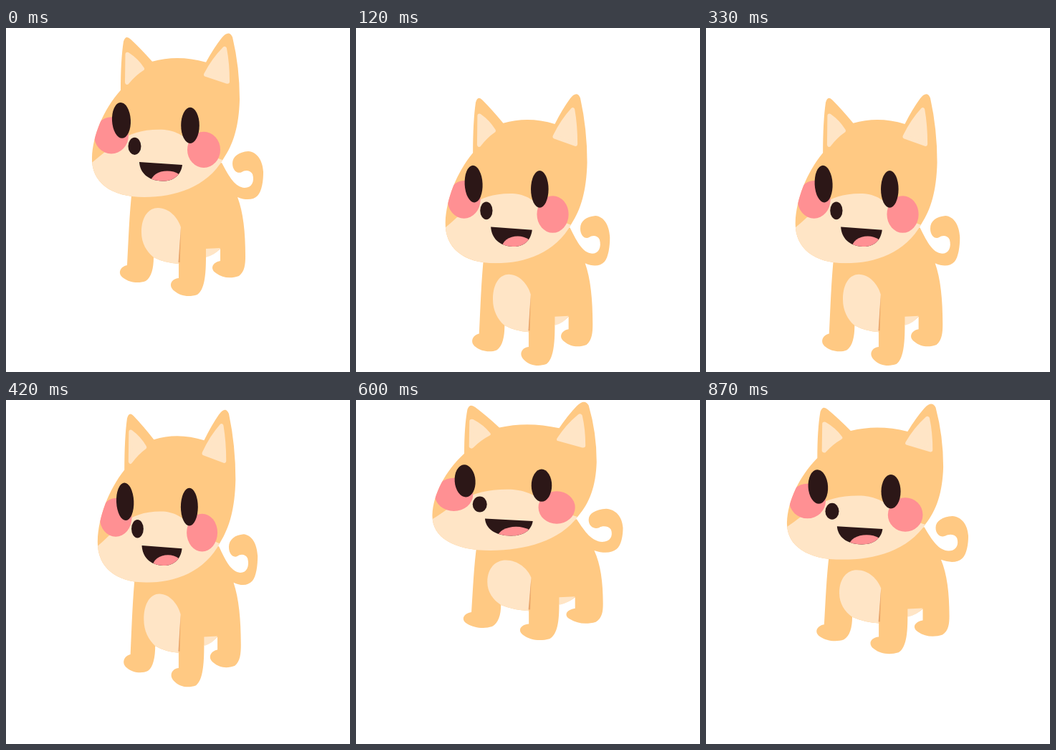
An HTML page that plays this animation: 480 by 480 pixels, repeating every 0.9 s.

```html
<!DOCTYPE html>
<html lang="en">
<head>
<meta charset="utf-8">
<title>Bouncing puppy</title>
<style>
  html, body { margin: 0; width: 100%; height: 100%; overflow: hidden; background: #fff; }
  svg { display: block; width: 100%; height: 100%; }
  .fur { fill: #ffc983; }
  .cream { fill: #ffe5c6; }
  .ear { fill: #ffe5c6; stroke: #ffe5c6; stroke-width: 6; stroke-linejoin: round; }
  .pink { fill: #ff9093; }
  .dark { fill: #2c1717; }
</style>
</head>
<body>
<svg viewBox="0 0 480 480">
  <defs>
    <path id="head" d="M160 87Q160 45 164 19Q167 9 174 16Q188 29 204 47Q240 37 279 48Q290 28 301 14Q311 2 316 13Q326 55 326 100C325 138 317 163 303 183C280 222 236 236 193 236C146 236 119 215 120 181C121 150 136 114 160 87Z"/>
    <path id="mouth" d="M186 187L246 191C244 207 232 214 218 213.5C198 213 187 202 186 187Z"/>
    <clipPath id="inHead"><use href="#head"/></clipPath>
    <clipPath id="inMouth"><use href="#mouth"/></clipPath>
  </defs>
  <g id="dog">
    <!-- body, legs and tail -->
    <path class="fur" d="M176 225C172 260 171 295 169 331C159 333 155 343 164 349C172 355 185 357 195 353C203 348 206 335 206 320Q222 328 241 329V349C230 350 226 360 235 367C243 374 255 376 267 372C277 365 279 345 279 319Q291 316 299 308V325C288 327 284 336 293 342C302 349 314 350 325 346C333 340 334 330 334 318C334 285 331 257 323 236C335 241 345 240 351 234C357 228 359 213 359 201C358 184 350 173 338 172C325 173 316 179 316 189C316 199 323 204 329 201C333 198 341 198 344 204C347 214 343 223 333 223C320 222 312 209 301 188Z"/>
    <path class="cream" d="M189 285C189 262 200 251 212 251C228 251 240 265 244 278L241 329Q222 328 206 320C196 312 189 300 189 285ZM279 308L299 307Q293 316 279 320Z"/>
    <path fill="#e9a66b" d="M244 278L242.7 327L240.5 327Z"/>
    <!-- head -->
    <use href="#head" class="fur"/>
    <path class="ear" d="M169.5 37Q182 45 190 57Q179 64 169 76Z"/>
    <path class="ear" d="M305 29Q309 50 309 75L279 65Q290 44 305 29Z"/>
    <g clip-path="url(#inHead)">
      <path class="cream" d="M117 190C148 168 162 142 214 142C255 142 258 172 308 186V240H110Z"/>
      <ellipse class="pink" cx="147" cy="150" rx="24" ry="25.5"/>
    </g>
    <ellipse class="pink" cx="276" cy="170" rx="23" ry="25"/>
    <g class="dark">
      <ellipse cx="161" cy="129" rx="13" ry="25" transform="rotate(-3 161 129)"/>
      <ellipse cx="257" cy="136" rx="12.8" ry="25"/>
      <ellipse cx="179.5" cy="165" rx="9" ry="12"/>
      <use href="#mouth"/>
    </g>
    <ellipse class="pink" cx="225" cy="215.5" rx="23" ry="16" clip-path="url(#inMouth)"/>
  </g>
</svg>
<script>
const LOOP = 900, STEP = 30, COUNT = LOOP / STEP;
const LANDING = 8; // middle of the landing, in steps
const CENTER = 239.5, GROUND = 374;
const dog = document.getElementById('dog');

// Eases from 0 to 1, starting flat and dying out smoothly
const settle = (x, span, power) => 1 - Math.exp(-((Math.max(0, x) / span) ** power));

function draw() {
  const step = Math.floor(performance.now() % LOOP / STEP) + .5;
  const away = Math.abs(step - LANDING);
  const u = Math.min(away, COUNT - away); // the fall mirrors the rise

  const stretch = settle(u, 2.8, 2.12);     // squashed to stretched
  const relax = settle(u - 5, 2.95, 2.12);  // stretched to apex pose
  const sx = 1.26 - .375 * stretch + .228 * relax;
  const sy = .786 + .31 * stretch - .189 * relax;
  const y = 486 - 151 * settle(u, 6.85, 3.35);

  dog.setAttribute('transform',
    `translate(${CENTER} ${y}) scale(${sx} ${sy}) translate(${-CENTER} ${-GROUND})`);
  requestAnimationFrame(draw);
}
draw();
</script>
</body>
</html>
```
